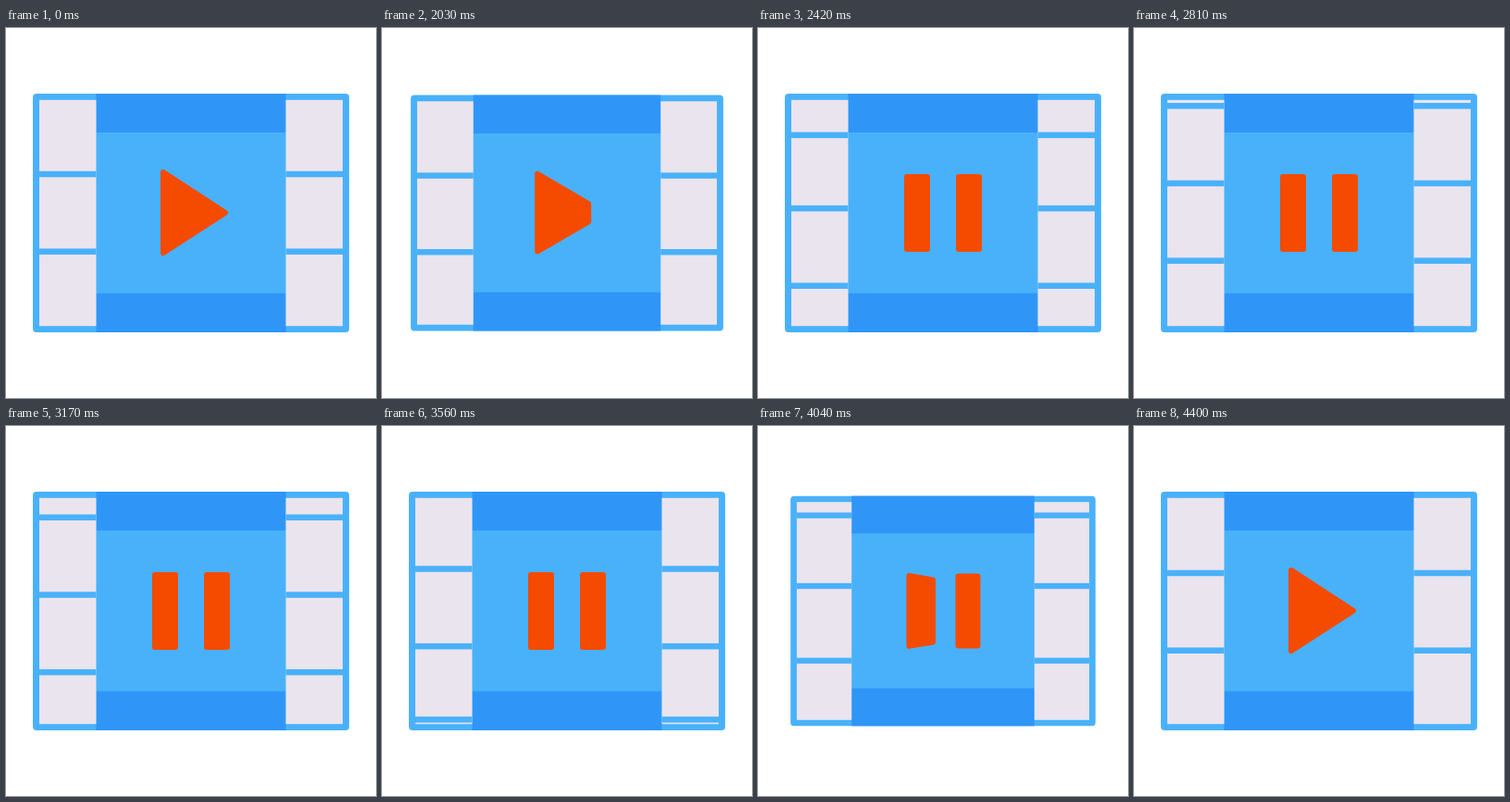
Write an HTML page with a canvas that moves like this. It is 400 by 400 pixels and loops after 4.43 s.

```html
<!DOCTYPE html>
<html lang="en">
<head>
<meta charset="utf-8">
<title>Film player</title>
<style>
  html, body { margin: 0; width: 100%; height: 100%; overflow: hidden; background: #fff; }
  canvas { display: block; width: 400px; height: 400px; }
</style>
</head>
<body>
<canvas id="stage" width="400" height="400"></canvas>
<script>
const ctx = document.getElementById('stage').getContext('2d');

const LOOP = 4430, HOLD = 2000, STEP = 30;
const SKY = '#49b1fa', BLUE = '#2f96f8', PALE = '#eae4ee', ORANGE = '#f44b00';
const SPACING = 83.7, LINE = 6.5;

// Film travel: [step, distance, speed]
const TRAVEL = [
  [0, 0, 0], [14, 204.4, 29], [39, 1191.8, 43],
  [52, 1745.2, 42], [68, 2348.6, 25], [80, 2498.5, 0]
];
// Joins in the strip where the spacing is a little tighter
const JOINS = [3, 20, 29], JOIN_SHIFT = 4.5;

const clamp = x => Math.max(0, Math.min(1, x));
const mix = (a, b, k) => a + (b - a) * k;

function filmShift(n) {
  let i = 0;
  while (i < TRAVEL.length - 2 && n > TRAVEL[i + 1][0]) i++;
  const [n0, d0, v0] = TRAVEL[i], [n1, d1, v1] = TRAVEL[i + 1];
  const len = n1 - n0, u = (n - n0) / len, u2 = u * u, u3 = u2 * u;
  return d0 * (2 * u3 - 3 * u2 + 1) + d1 * (3 * u2 - 2 * u3)
    + len * (v0 * (u3 - 2 * u2 + u) + v1 * (u3 - u2));
}

const press = (n, start) => 0.06 * clamp(1 - Math.abs(n - start - 5) / 5);

function rect(color, x, y, w, h) {
  ctx.fillStyle = color;
  ctx.fillRect(x, y, w, h);
}

function roundedShape(points) {
  ctx.beginPath();
  points.forEach(([x, y]) => ctx.lineTo(x, y));
  ctx.closePath();
  ctx.fill();
  ctx.stroke();
}

function drawFrame() {
  ctx.fillStyle = SKY;
  ctx.beginPath();
  ctx.roundRect(29, 71, 342, 258, 4);
  ctx.fill();
  rect(BLUE, 97.5, 71, 205, 42);
  rect(BLUE, 97.5, 286.7, 205, 42.3);
}

function drawStrips(shift) {
  const sides = [36, 302.5], width = 61.5;
  sides.forEach(x => rect(PALE, x, 77.8, width, 244.4));
  for (let i = -2; i <= 32; i++) {
    const tight = JOINS.filter(j => i >= j).length * JOIN_SHIFT;
    const y = 158 - SPACING * i + tight + shift;
    if (y < 77 || y > 319) continue;
    sides.forEach(x => rect(SKY, x, y - LINE / 2, width, LINE));
  }
}

// k = 0 is the play triangle, k = 1 the pause bars
function drawIcon(k) {
  ctx.fillStyle = ctx.strokeStyle = ORANGE;
  ctx.lineWidth = 6;
  ctx.lineJoin = 'round';
  const left = mix(170, 161, k), right = mix(237, 183, k);
  roundedShape([
    [left, mix(156, 161, k)], [right, mix(199.7, 161, k)],
    [right, mix(199.7, 239, k)], [left, mix(243, 239, k)]
  ]);
  if (k > 0.5) roundedShape([[217, 161], [239, 161], [239, 239], [217, 239]]);
}

function draw(time) {
  const n = Math.max(0, Math.floor((time % LOOP - HOLD) / STEP));
  const scale = 1 - press(n, 0) - press(n, 65);
  const morph = clamp(n / 4) - clamp((n - 67.58) / 4);

  rect('#fff', 0, 0, 400, 400);
  ctx.save();
  ctx.translate(200, 200);
  ctx.scale(scale, scale);
  ctx.translate(-200, -200);
  drawFrame();
  drawStrips(filmShift(n));
  drawIcon(morph);
  ctx.restore();
}

let start;
function tick(now) {
  start ??= now;
  draw(now - start);
  requestAnimationFrame(tick);
}
draw(0);
requestAnimationFrame(tick);
</script>
</body>
</html>
```
